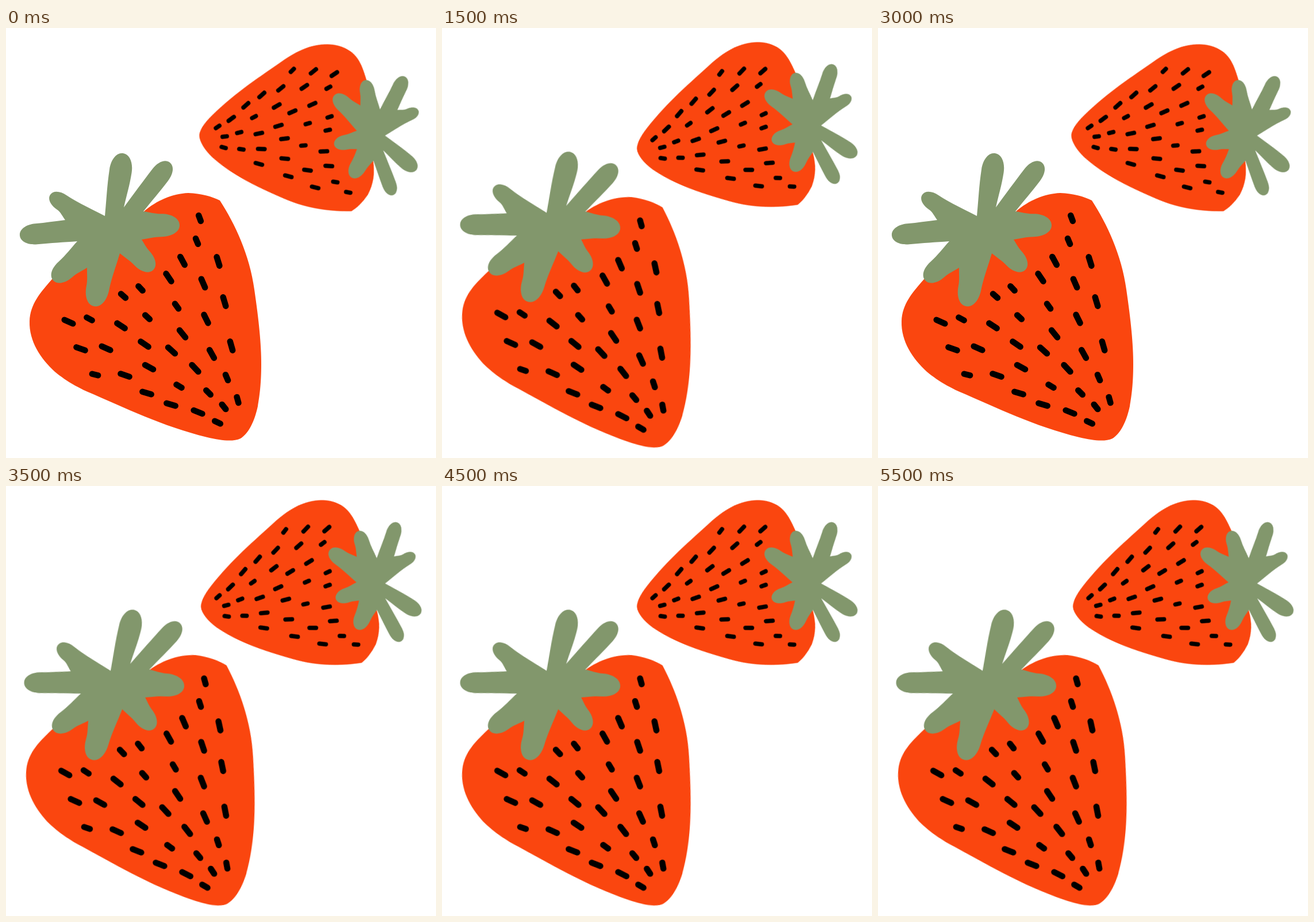
Write an HTML page that moves like this. It is 748 by 748 pixels and loops after 6000 ms.

```html
<!DOCTYPE html>
<html lang="en">
<head>
<meta charset="utf-8">
<title>Strawberries</title>
<style>
  html, body { margin: 0; width: 100%; height: 100%; overflow: hidden; background: #fff; }
  svg { display: block; width: 100%; height: 100%; }
  .rock { animation: rock 1s step-end infinite; }
  .big { --tilt: 5deg; transform-origin: 241px 438px; }
  .small { --tilt: -7.5deg; transform-origin: 525px 177px; }
  @keyframes rock {
    0% { transform: rotate(0deg); }
    50% { transform: rotate(var(--tilt)); }
  }
</style>
</head>
<body>
<svg viewBox="0 0 748 748">
  <defs>
    <g id="berry">
      <path fill="#fa460f" d="M240 319C262 300 290 288 317 287C340 288 358 293 372 300
        C398 340 424 395 432 455C440 510 444 550 444 585C444 620 441 640 438 658
        C432 685 422 705 408 714C395 720 375 718 350 712C270 692 210 662 140 632
        C110 618 95 606 85 598C60 575 40 545 41 510C42 480 60 460 80 437Z"/>
      <g id="seeds" stroke="#000" stroke-width="10.5" stroke-linecap="round"/>
      <path id="leaves" fill="#82976c"/>
    </g>
  </defs>
  <g class="rock big"><use href="#berry"/></g>
  <g class="rock small">
    <use href="#berry" transform="translate(922.2 204.9) rotate(121.6) scale(.713)"/>
  </g>
</svg>
<script>
const points = text => text.trim().split(/\s+/).map(p => p.split(',').map(Number));
const move = ([x, y], [dx, dy], k) => [x + dx * k, y + dy * k];
const between = (a, b, k) => [a[0] + (b[0] - a[0]) * k, a[1] + (b[1] - a[1]) * k];

// A rounded leaf from notch a over the tip to notch b, r being half its width
function leaf(a, tip, r, b) {
  const base = between(a, b, .5);
  const len = Math.hypot(tip[0] - base[0], tip[1] - base[1]);
  const u = [(tip[0] - base[0]) / len, (tip[1] - base[1]) / len];
  const n = [u[1], -u[0]];
  const side = (notch, sign) => {
    const shoulder = move(move(tip, u, -1.6 * r), n, sign * r);
    const reach = Math.hypot(shoulder[0] - notch[0], shoulder[1] - notch[1]);
    return [
      between(notch, shoulder, .35), move(shoulder, u, -.35 * reach), shoulder,
      move(shoulder, u, .9 * r), move(tip, n, sign * .6 * r)
    ];
  };
  const [p, q, s, v, w] = side(a, 1);
  const [p2, q2, s2, v2, w2] = side(b, -1);
  return `C${p} ${q} ${s}C${v} ${w} ${tip}C${w2} ${v2} ${s2}C${q2} ${p2} ${b}`;
}

// Notch x, y, then the tip x, y and half width of the leaf that follows it
const crown = points(`124,371,24,361,18 103,334,77,290,15 172,327,204,218,19.5
  205,312,285,234,17 239,319,302,343,20 236,368,256,421,18
  198,392,153,484,20 141,417,82,439,18`);
const notch = i => crown[i % crown.length].slice(0, 2);
document.getElementById('leaves').setAttribute('d', `M${notch(0)}` + crown.map(
  ([, , x, y, r], i) => leaf(notch(i), [x, y], r, notch(i + 1))).join('') + 'Z');

// Seeds lean towards the tip of the fruit
function sow(length, text) {
  for (const [x, y] of points(text)) {
    const angle = Math.atan2(715 - y, 410 - x) - .17;
    const half = [Math.cos(angle) * length / 2, Math.sin(angle) * length / 2];
    const line = document.createElementNS('http://www.w3.org/2000/svg', 'line');
    const [x1, y1] = move([x, y], half, -1), [x2, y2] = move([x, y], half, 1);
    const ends = { x1, y1, x2, y2 };
    for (const key in ends) line.setAttribute(key, ends[key]);
    document.getElementById('seeds').append(line);
  }
}

sow(16, `369,406 307,405 283,434 343,444 380,476 348,506 109,511 200,518 307,532
  241,550 392,553 130,558 174,557 288,561 358,567 249,590 329,592 207,604
  245,635 287,655 334,668`);
sow(10.5, `337,331 332,371 234,453 204,466 297,484 246,503 145,506 155,603 384,608
  301,623 352,634 403,647 379,659 368,686`);
</script>
</body>
</html>
```
